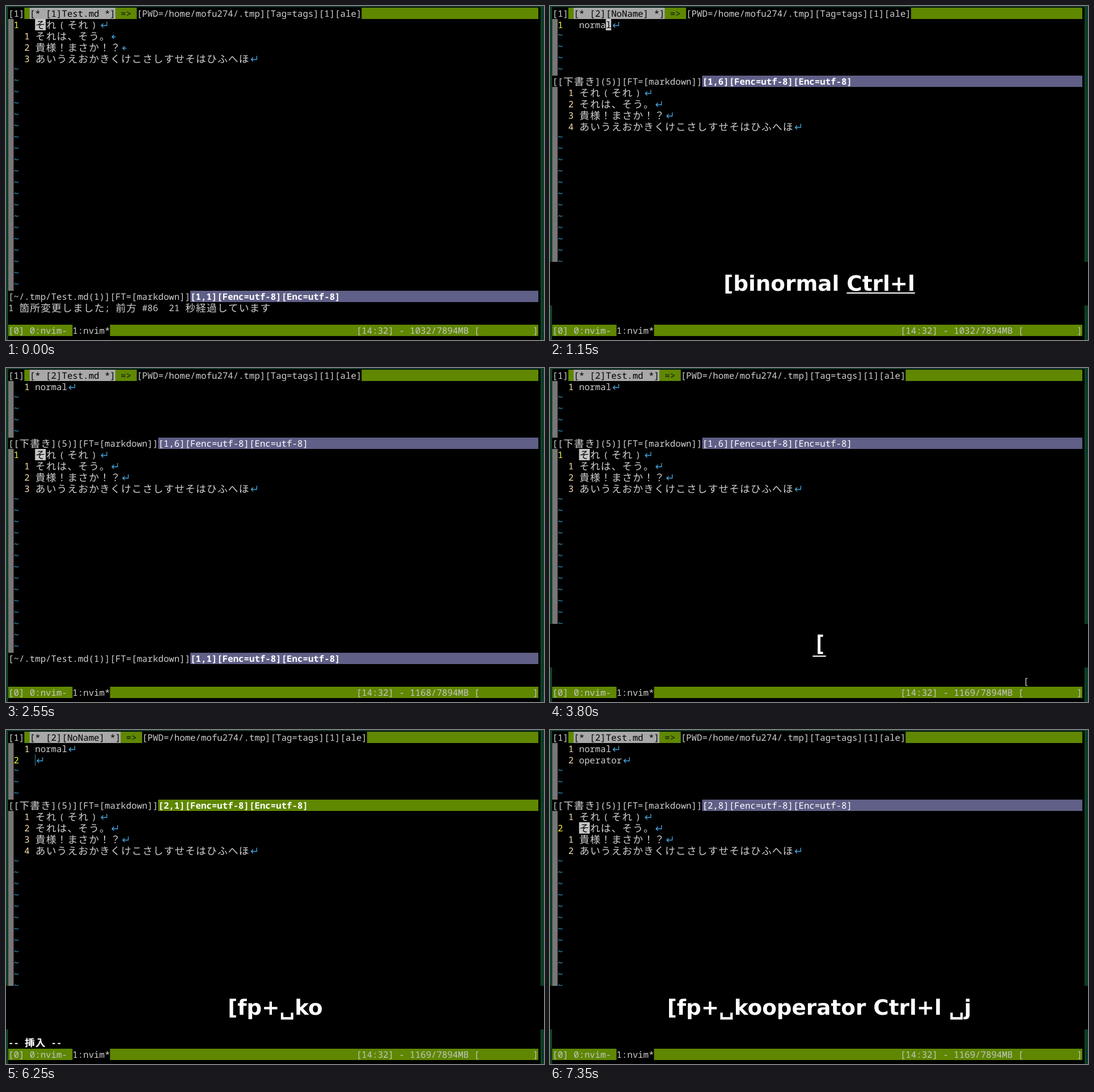
Animation, 949 px wide and 590 px high, one loop 8 s. Source, as an HTML page:

```html
<!DOCTYPE html>
<html lang="ja">
<head>
<meta charset="utf-8">
<title>Editor session</title>
<style>
html, body { margin: 0; width: 949px; height: 590px; overflow: hidden; background: #000; }
svg { position: absolute; left: 0; top: 0; }
text { font-family: "Noto Sans Mono", "DejaVu Sans Mono", monospace; font-size: 15.74px; text-anchor: middle; text-rendering: geometricPrecision; }
.wide { font-family: "Noto Sans CJK JP", "Noto Sans CJK", sans-serif; font-size: 17.8px; font-weight: 350; }
.bold { font-weight: 700; }
.arrow { fill: none; stroke: #46a6df; stroke-width: 1.3; }
#keys {
  position: absolute; left: 0; top: 452px; width: 950px; height: 77px; background: #000; color: #fff;
  font: 700 37.33px/77px "DejaVu Sans", sans-serif; text-align: center; white-space: pre; overflow: hidden;
  text-rendering: geometricPrecision;
}
#keys u { text-decoration-thickness: 2px; text-decoration-skip-ink: none; text-underline-offset: 3px; }
#keys.lone { font: 700 39px/66px "Noto Sans Mono", monospace; }
#keys.lone u { text-underline-offset: 9px; }
</style>
</head>
<body>
<svg id="term" width="949" height="590" viewBox="0 0 949 590"></svg>
<div id="keys"></div>
<script>
const LOOP = 8000, COLS = 99, CW = 935 / COLS, RH = 20;
const GREEN = '#5f8700', PURPLE = '#5f5f87', FG = '#d0d0d0', BLUE = '#46a6df', RED = '#ff5f5f';
const EDGE = '#14382d', RIM = '#0b5228';
const DOC = ['それ（それ）', 'それは、そう。', '貴様！まさか！？', 'あいうえおかきくけこさしすせそはひふへほ'];
const FENC = '[Fenc=utf-8][Enc=utf-8]';

const colX = c => 4 + c * CW;
const rowY = r => 3 + r * RH;
const isWide = ch => ch.charCodeAt(0) > 0x2fff;
const width = s => [...s].reduce((n, ch) => n + (isWide(ch) ? 2 : 1), 0);

// ---- drawing helpers, all in terminal cells ----
const box = (x, y, w, h, fill) => `<rect x="${x}" y="${y}" width="${w}" height="${h}" fill="${fill}"/>`;
const fill = (row, col, n, color) => box(colX(col), rowY(row), n * CW, RH, color);

function write(row, col, str, color = FG, cls = '', dy = 0) {
  const narrow = { s: '', x: [] }, wide = { s: '', x: [] };
  for (const ch of str) {
    const w = isWide(ch) ? 2 : 1;
    const paren = { '（': '(', '）': ')' }[ch];
    const run = w === 2 && !paren ? wide : narrow;
    if (ch.trim()) {
      run.s += paren || ch;
      run.x.push((colX(col) + w * CW / 2).toFixed(2));
    }
    col += w;
  }
  const put = (run, name, y) => run.s
    ? `<text class="${name} ${cls}" x="${run.x.join(' ')}" y="${y + dy}" fill="${color}">${run.s}</text>` : '';
  return put(narrow, '', rowY(row) + 15.7) + put(wide, 'wide', rowY(row) + 16.6);
}

function arrow(row, col, cut) {
  const stem = cut ? 'M10 1.5H3.5' : 'M13.3 -5V1.5H3.5';
  return `<path class="arrow" transform="translate(${colX(col)} ${rowY(row) + 10})" d="${stem}M7 -2L3.5 1.5L7 5"/>`;
}

const cursor = (row, col, ch) => fill(row, col, width(ch), '#c6c6c6') + write(row, col, ch, '#000');

// Lines of a window: active ones number relative to the current line
function pane(top, bottom, lines, current, cut) {
  let out = box(4, rowY(top), CW, (bottom - top + 1) * RH, '#767676');
  for (let r = top; r <= bottom; r++) {
    const i = r - top;
    if (i >= lines.length) {
      out += write(r, 1, '~', BLUE, '', -2);
      continue;
    }
    if (i === current) out += write(r, 1, String(i + 1), '#f4f43a');
    else out += write(r, 3, String(current < 0 ? i + 1 : Math.abs(i - current)), '#ffdfaf');
    out += write(r, 5, lines[i]) + arrow(r, 5 + width(lines[i]), cut && (i === 1 || i === 2));
  }
  return out;
}

function status(row, name, pos, active, insert) {
  const left = name + '[FT=[markdown]]', n = width(left);
  return write(row, 0, left) + fill(row, n, COLS - n, insert ? GREEN : PURPLE) +
    write(row, n, `[${pos}]` + FENC, '#fff', active ? 'bold' : '');
}

function tabline(s) {
  const tab = `[* [${s.split ? 2 : 1}]${s.up ? '[NoName]' : 'Test.md'} *]`;
  const info = '[PWD=/home/mofu274/.tmp][Tag=tags][1][ale]';
  const end = 4 + tab.length, from = end + 4;
  return fill(0, 3, COLS - 3, GREEN) + write(0, 0, '[1]') +
    fill(0, 4, tab.length, '#a8a8a8') + write(0, 4, tab, '#000') +
    write(0, end, ' =>', '#111') + fill(0, from, info.length, '#000') + write(0, from, info);
}

function tmux(s) {
  return fill(28, 0, COLS, GREEN) + write(28, 0, '[0] 0:nvim-', '#c6c6c6') +
    fill(28, 12, 7, '#000') + write(28, 12, '1:nvim*') +
    write(28, 65, `[14:32] - ${s.mem}/7894MB [`, '#c6c6c6') + write(28, 98, ']', '#c6c6c6');
}

function lowCursor(s, top) {
  const row = top + s.line;
  if (!s.paren) return cursor(row, 5, 'そ');
  const rule = (col, color) => box(colX(col), rowY(row) + 17, 2 * CW, 1.4, color);
  return fill(row, 9, 2, RED) + write(row, 9, '（', '#000') + rule(9, '#ffd0d0') +
    write(row, 15, '）', RED) + rule(15, RED);
}

function upCursor(s) {
  const row = s.text.length, line = s.text[row - 1];
  if (s.insert) return box(Math.round(colX(5 + line.length)), rowY(row), 1, RH, '#4a7f9c');
  const at = Math.max(0, line.length - 1);
  return cursor(row, 5 + at, line[at] || ' ');
}

function frame() {
  return box(0, 0, 949, 2, EDGE) + box(0, 0, 2, 590, EDGE) + box(946, 0, 3, 590, EDGE) +
    box(2, 1, 1.5, 589, RIM) + box(943, 1, 2.5, 589, RIM);
}

function screen(s) {
  const top = s.split ? 7 : 1;
  let out = frame() + tabline(s);
  if (s.split) {
    const n = s.text.length, col = s.text[n - 1].length;
    const pos = `${n},${s.insert ? col + 1 : Math.max(1, col)}`;
    out += pane(1, 5, s.text, s.up ? n - 1 : -1) + status(6, '[[下書き](5)]', pos, s.up, s.insert);
    if (s.up) out += upCursor(s);
  }
  out += pane(top, 24, DOC, s.up ? -1 : s.line, !s.split);
  if (!s.up) out += lowCursor(s, top);
  out += status(25, '[~/.tmp/Test.md(1)]', `${s.line + 1},${s.paren ? 7 : 1}`, !s.up);
  if (!s.split) out += write(26, 0, '1 箇所変更しました; 前方 #86  21 秒経過しています');
  if (s.insert) out += write(27, 0, '-- 挿入 --', '#fff', 'bold', -0.5);
  return out + write(27, 88, s.cmd) + tmux(s);
}

// ---- timeline: each step adds to the state before it ----
const steps = [];
let state = { split: false, up: false, insert: false, text: [''], line: 0, paren: false,
  old: '', hot: '', cmd: '', mem: 1032 };

function at(t, change = {}) {
  state = { ...state, ...change };
  steps.push([t, state]);
}
const press = (t, key, change, gap = '') => at(t, { old: state.old + state.hot + gap, hot: key, ...change });
const cool = t => press(t, '');
function type(word, times) {
  [...word].forEach((ch, i) => {
    const text = [...state.text];
    text.push(text.pop() + ch);
    press(times[i], ch, { text });
  });
}

at(0);
press(250, '[', { cmd: '[' });
press(300, 'b');
at(350, { split: true, up: true, cmd: '' });
press(450, 'i');
at(500, { insert: true });
type('normal', [550, 600, 650, 700, 800, 850]);
cool(950);
press(1050, 'Ctrl+l', {}, ' ');
at(1150, { insert: false });
press(1250, '␣', {}, ' ');
press(1350, 'j', { up: false });
cool(1400);
at(2300, { mem: 1168 });
at(2550, { old: '', hot: '' });
press(3800, '[', { cmd: '[', mem: 1169 });
cool(3900);
press(4650, 'f', { cmd: '' });
cool(4750);
press(4850, 'p');
at(4900, { paren: true });
cool(4950);
press(5450, '+');
at(5500, { paren: false, line: 1 });
cool(5550);
press(5900, '␣');
press(6000, 'k');
at(6050, { up: true });
press(6150, 'o');
at(6200, { insert: true, text: [...state.text, ''] });
cool(6250);
type('operator', [6600, 6650, 6700, 6750, 6800, 6850, 6900, 6950]);
press(7100, 'Ctrl+l', { insert: false }, ' ');
press(7200, '␣', {}, ' ');
press(7300, 'j', { up: false });
cool(7350);

const term = document.getElementById('term'), keys = document.getElementById('keys');
let shown = null;

function show(s) {
  const all = s.old + s.hot;
  term.innerHTML = screen(s);
  keys.hidden = !all;
  keys.className = all === '[' ? 'lone' : '';
  keys.innerHTML = s.old + (s.hot ? `<u>${s.hot}</u>` : '');
}

const start = performance.now();
function tick() {
  const t = (performance.now() - start) % LOOP;
  const s = steps.filter(step => step[0] <= t).pop()[1];
  if (s !== shown) show(shown = s);
  requestAnimationFrame(tick);
}
tick();
</script>
</body>
</html>
```
